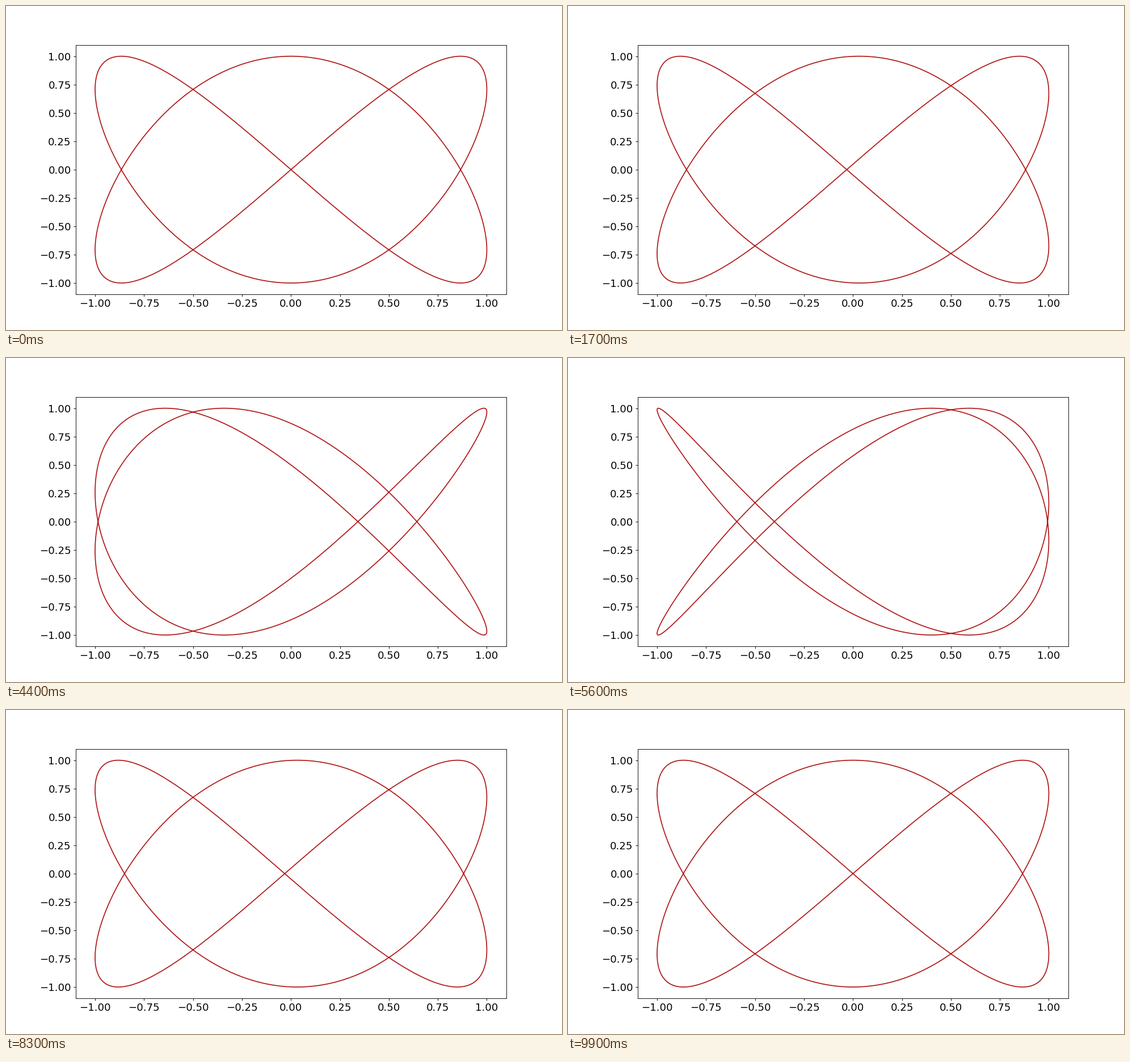
Recreate the animation shown at these times as a matplotlib script. Size 980x572 px, loop 10000 ms.

```python
import numpy as np
import matplotlib.pyplot as plt
from matplotlib.animation import FuncAnimation

FRAMES = 100
INTERVAL = 100
SCALE = 9.8 / 12  # layout sized for a 12 inch wide figure

plt.rcParams.update({
    "font.family": "DejaVu Sans",
    "font.size": 16 * SCALE,
    "axes.linewidth": 0.8 * SCALE,
})

t = np.linspace(0, 2 * np.pi, 1000)
phases = np.linspace(0, 2 * np.pi, FRAMES)
ticks = np.linspace(-1, 1, 9)

fig = plt.figure(figsize=(9.8, 5.72), dpi=100, facecolor="white")
ax = fig.add_axes([0.125, 0.11, 0.775, 0.77])
ax.set(xlim=(-1.1, 1.1), ylim=(-1.1, 1.1), xticks=ticks, yticks=ticks)
ax.tick_params(length=3.5 * SCALE, pad=3.5 * SCALE, width=0.8 * SCALE)

curve, = ax.plot([], [], color="#b01515", lw=1.5 * SCALE)


def update(frame):
    """Lissajous figure 2:3 with a steadily advancing phase."""
    curve.set_data(np.sin(2 * t + phases[frame]), np.sin(3 * t))
    return curve,


anim = FuncAnimation(fig, update, frames=FRAMES, interval=INTERVAL,
                     repeat=True, repeat_delay=0)
plt.show()
```
